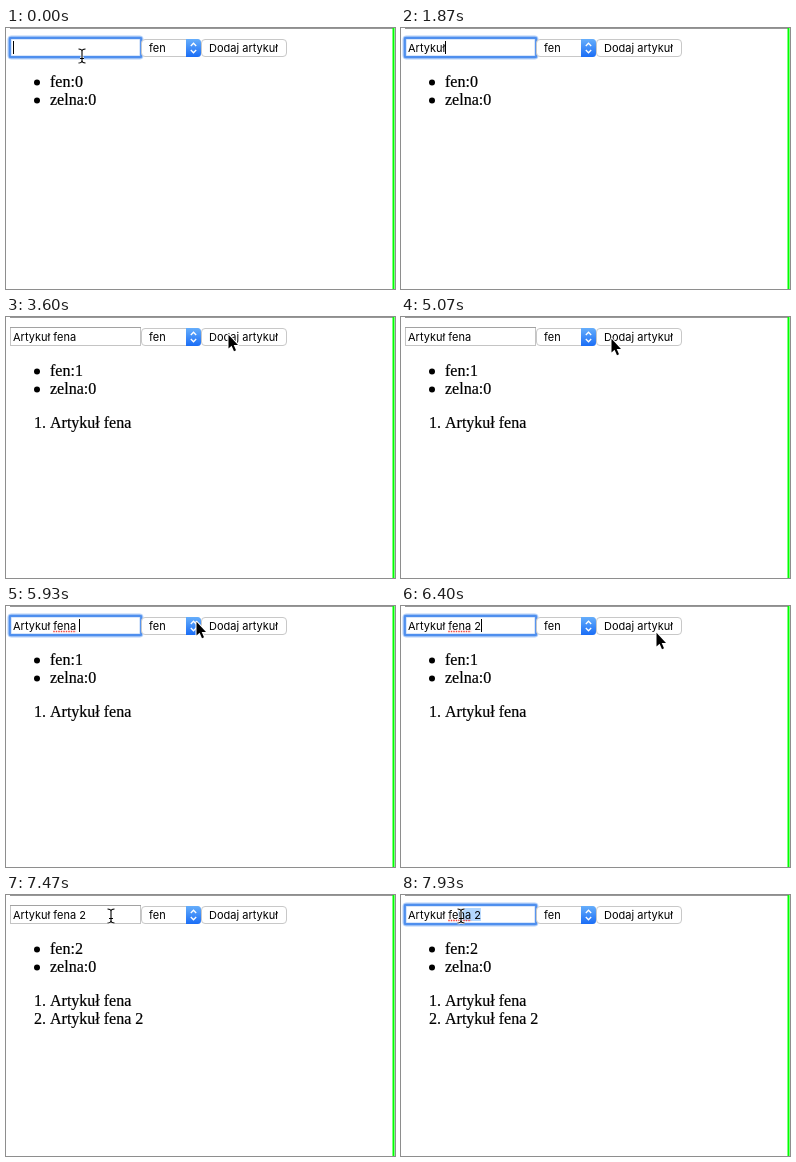
Recreate the animation shown at these times as an HTML page. Size 389 by 261 pixels, loop 8000 ms.

```html
<!DOCTYPE html>
<html lang="pl">
<head>
<meta charset="utf-8">
<title>Dodaj artykuł</title>
<style>
  html, body { margin: 0; width: 100%; height: 100%; overflow: hidden; background: #fff; }
  svg { display: block; width: 389px; height: 261px; }
  text { white-space: pre; }
  .page { font: 16px "Liberation Serif", serif; }
  .page text { stroke: #000; stroke-width: .2; }
  .ui { font: 11px Inter, sans-serif; }
  .control { fill: #fff; stroke: #c8c8c8; }
  .pressed { fill: url(#blue); stroke: #2f7df0; }
  .squiggle { stroke: #f0433a; stroke-width: 1.6; stroke-dasharray: 1.5 1; }
</style>
</head>
<body>
<svg viewBox="0 0 389 261">
  <defs>
    <linearGradient id="blue" x2="0" y2="1">
      <stop stop-color="#66aefb"/><stop offset="1" stop-color="#1a6df6"/>
    </linearGradient>
    <path id="beamShape" d="M-3.5 -7Q0 -7 0 -4.5Q0 -7 3.5 -7M0 -4.5V4.5M-3.5 7Q0 7 0 4.5Q0 7 3.5 7M-2 2.5H2"/>
  </defs>
  <rect x="4" width="383" height="1" fill="#979797"/>
  <rect x="386.5" width="2" height="261" fill="#0f0"/>

  <rect x="4.5" y="10.5" width="130" height="18" fill="#fff" stroke="#c4c4c4"/>
  <path d="M4 10.5H135" stroke="#a2a2a2"/>
  <g id="ring" fill="none">
    <rect x="3.5" y="9.5" width="132" height="20" rx="2" stroke="#b4d0f8" stroke-width="4"/>
    <rect x="3.8" y="9.8" width="131.4" height="19.4" rx="1" stroke="#4f8fee" stroke-width="2.2"/>
  </g>
  <rect id="selection" y="13" height="13" fill="#b3d7fe"/>
  <path id="squiggle" class="squiggle"/>
  <text id="field" class="ui" x="7" y="24"></text>
  <rect id="caret" y="13" width="1" height="13"/>

  <rect class="control" x="135.5" y="11.5" width="59" height="17" rx="3.5"/>
  <path d="M180 11H191.5a3.5 3.5 0 0 1 3.5 3.5V25.5a3.5 3.5 0 0 1 -3.5 3.5H180Z" fill="url(#blue)"/>
  <path d="M184.8 18L187.5 15.2L190.2 18M184.8 22L187.5 24.8L190.2 22" fill="none" stroke="#fff" stroke-width="1.3"/>
  <text class="ui" x="143" y="24">fen</text>

  <rect id="button" x="195.5" y="11.5" width="85" height="17" rx="3.5"/>
  <text id="label" class="ui" x="203" y="24">Dodaj artykuł</text>

  <g class="page">
    <circle cx="31" cy="54.5" r="3"/><text id="count" x="44" y="59"></text>
    <circle cx="31" cy="72.5" r="3"/><text x="44" y="77">zelna:0</text>
    <g id="first"><text x="28" y="111">1.</text><text x="44" y="111">Artykuł fena</text></g>
    <g id="second"><text x="28" y="129">2.</text><text x="44" y="129">Artykuł fena 2</text></g>
  </g>

  <path id="arrow" d="M.5 .8V14.6L3.6 11.7L6 17.2L8 16.3L5.7 10.9H10Z" stroke="#fff" stroke-width="2" paint-order="stroke" stroke-linejoin="round"/>
  <g id="beam" fill="none">
    <use href="#beamShape" stroke="#fff" stroke-width="2.6"/>
    <use href="#beamShape" stroke="#000" stroke-width="1.1"/>
  </g>
</svg>
<script>
const LOOP = 8000, TICK = 200 / 3;
const KEY_GAP = 160, GLIDE = 250, HOLD = 135;
const title = 'Artykuł fena 2';
const bursts = [[530, 4], [1470, 8], [5530, 1], [6070, 1]]; // start, letters
const focuses = [0, 5400, 7530];
const clicks = [3330, 6470];
const home = [76, 28];
const glides = [ // start, then where the pointer comes to rest
  [2740, 181, 32], [3010, 222, 17], [3900, 234, 21], [5000, 98, 21],
  [5670, 190, 15], [6000, 255, 26], [6960, 105, 21], [7620, 60, 21]
];

const $ = id => document.getElementById(id);
const pen = document.createElement('canvas').getContext('2d');
pen.font = '11px Inter, sans-serif';

const clamp = (v, lo, hi) => Math.min(hi, Math.max(lo, v));
const smooth = k => k * k * (3 - 2 * k);
const latest = (times, t) => Math.max(-1, ...times.filter(time => time <= t));
const show = (id, on) => $(id).style.display = on ? '' : 'none';
const set = (id, attrs) => Object.entries(attrs).forEach(([k, v]) => $(id).setAttribute(k, v));
const edge = n => 7 + pen.measureText(title.slice(0, n)).width;

const typed = t => bursts.reduce((sum, [start, letters]) =>
  sum + clamp(Math.floor((t - start) / KEY_GAP) + 1, 0, letters), 0);

const pointer = t => glides.reduce(([x, y], [start, toX, toY]) => {
  const k = smooth(clamp((t - start) / GLIDE, 0, 1));
  return [x + (toX - x) * k, y + (toY - y) * k];
}, home).map(Math.round);

function nearestEdge(x, length) {
  let best = length;
  for (let n = 0; n < length; n++)
    if (Math.abs(edge(n) - x) < Math.abs(edge(best) - x)) best = n;
  return best;
}

function draw(t) {
  const length = typed(t);
  const lastFocus = latest(focuses, t), lastClick = latest(clicks, t);
  const focused = lastFocus > lastClick;
  const [x, y] = pointer(t);

  $('field').textContent = title.slice(0, length);
  show('ring', focused);

  const dragging = lastFocus === focuses[2];
  const start = dragging ? nearestEdge(x, length) : length;
  show('selection', start < length);
  set('selection', { x: edge(start), width: edge(length) - edge(start) });
  const blinkedOff = length === 0 && t >= TICK;
  show('caret', focused && start === length && !blinkedOff);
  set('caret', { x: Math.round(edge(length)) });

  const [from, to] = lastClick < 0 ? [0, 7] : [8, 12];
  show('squiggle', focused && length > 7);
  set('squiggle', { d: `M${edge(from)} 25.5H${edge(to)}` });

  const pressed = lastClick >= 0 && t < lastClick + HOLD;
  set('button', { class: pressed ? 'pressed' : 'control' });
  set('label', { fill: pressed ? '#fff' : '#000' });

  const added = clicks.filter(c => t >= c + HOLD).length;
  $('count').textContent = 'fen:' + added;
  show('first', added > 0);
  show('second', added > 1);

  // Typing hides the pointer until it moves again.
  const visible = length === 0 || t >= glides[0][0] + 2 * TICK;
  const overField = x > 4 && x < 135 && y > 9 && y < 30;
  show('arrow', visible && !overField);
  show('beam', visible && overField);
  for (const id of ['arrow', 'beam']) set(id, { transform: `translate(${x} ${y})` });
}

const origin = performance.now();
function frame(now) {
  const tick = Math.floor((Math.max(0, now - origin) % LOOP) / TICK + 0.1);
  draw(tick * TICK % LOOP);
  requestAnimationFrame(frame);
}
draw(0);
requestAnimationFrame(frame);
</script>
</body>
</html>
```
